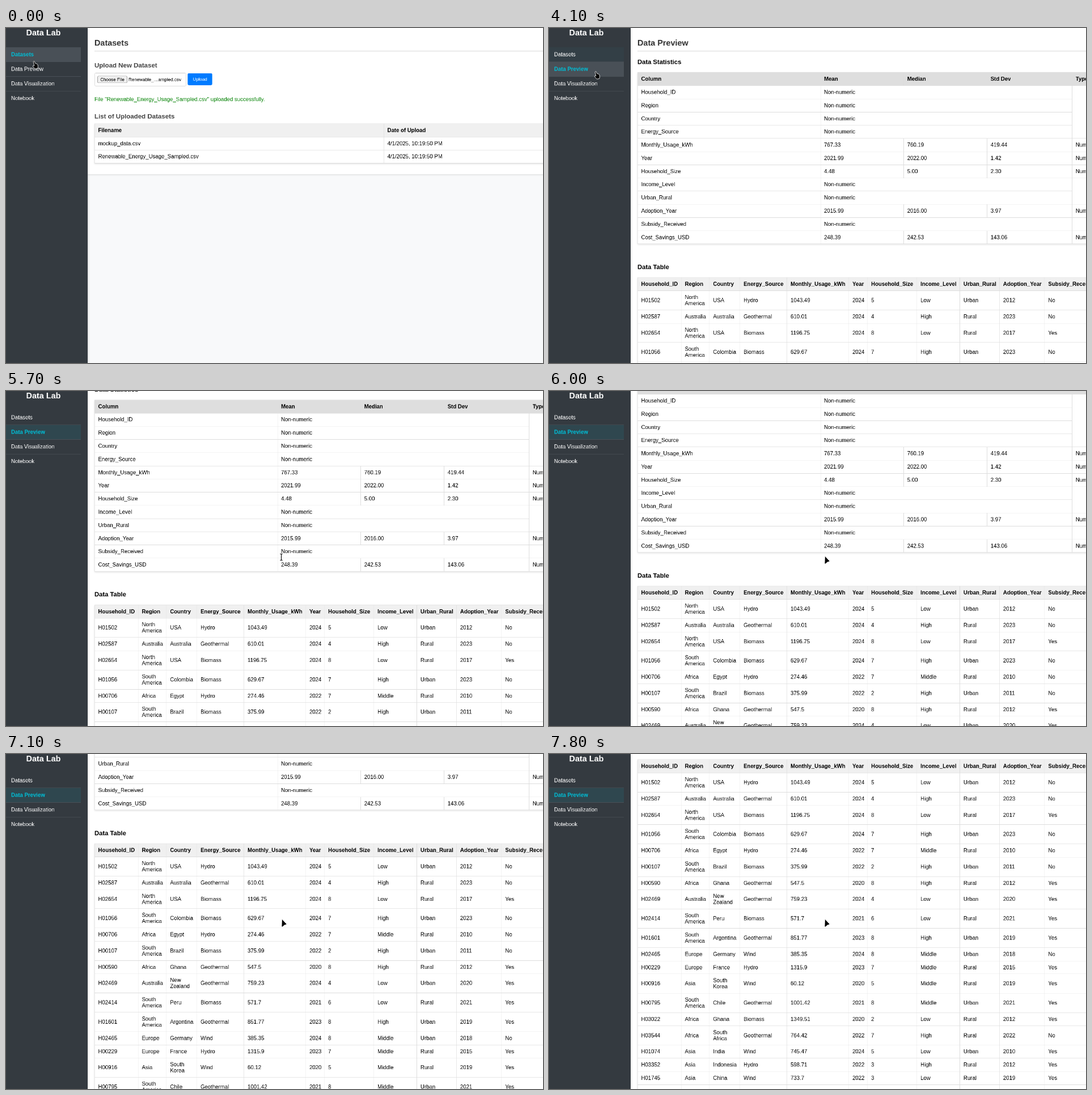
Write an HTML page that moves like this. It is 947 by 591 pixels and loops after 8000 ms.

```html
<!DOCTYPE html>
<html lang="en">
<head>
<meta charset="utf-8">
<title>Dataset browser</title>
<style>
  html, body { margin: 0; width: 100%; height: 100%; overflow: hidden; background: #f8f9fa; }
  /* will-change keeps the text drawn at full size and then scaled down smoothly */
  #app {
    position: absolute; width: 1579px; height: 985px; overflow: hidden; background: #f8f9fa;
    transform: scale(.6); transform-origin: 0 0; will-change: transform;
    font: 16px/18px "Liberation Sans", Arial, sans-serif; color: #000;
  }
  #side {
    position: absolute; left: 0; top: 0; width: 240px; height: 100%;
    background: #343a40; color: #fff; box-shadow: 2px 0 5px rgba(0,0,0,.15);
  }
  #side h1 { position: absolute; top: 0; width: 220px; margin: 0; font-size: 24px; line-height: 28px; text-align: center; }
  nav { position: absolute; top: 57.3px; width: 220px; }
  nav div { box-sizing: border-box; height: 42.8px; padding: 12px 15px; border-bottom: 1px solid #495057; }
  nav div:last-child { border: 0; }
  nav .active { color: #00bcd4; font-weight: bold; }
  .page { position: absolute; left: 240px; top: 0; width: 1600px; background: #fff; box-shadow: 0 2px 4px rgba(0,0,0,.12); }
  #datasets { height: 429.5px; }
  #preview { height: 2400px; }
  .page > * { position: absolute; left: 20px; margin: 0; white-space: nowrap; }
  h2 { top: 30px; width: 1600px; height: 37px; font-size: 24px; line-height: 28px; color: #333; border-bottom: 2px solid #e2e2e2; }
  h3 { font-size: 18.72px; line-height: 22px; }
  #datasets h3 { font-size: 19.2px; color: #444; }
  table { border-collapse: collapse; table-layout: fixed; box-shadow: 0 2px 5px rgba(0,0,0,.12); }
  .page td, .page th { padding: 9.9px; border: 1px solid #ddd; text-align: left; white-space: normal; }
  th { background: #f0f0f0; white-space: nowrap !important; }
  #stats th { background: #dedede; }
  .file { top: 131.5px; box-sizing: border-box; width: 270px; height: 39px; border: 1px solid #ccc; border-radius: 4px; }
  .file, .upload { font-size: 13.333px; line-height: 15px; }
  .file span { position: absolute; left: 99px; top: 11px; }
  .file b {
    position: absolute; left: 8px; top: 8px; box-sizing: border-box; width: 87px; height: 21px; line-height: 19px;
    font-weight: normal; text-align: center; background: #efefef; border: 1px solid #767676; border-radius: 3px;
  }
  .page .upload { left: 294px; top: 133px; padding: 10px 15px; border-radius: 4px; background: #007bff; color: #fff; }
  #pointer { position: absolute; left: 0; top: 0; width: 20px; height: 20px; overflow: visible; }
</style>
</head>
<body>
<div id="app">
  <section class="page" id="datasets">
    <h2>Datasets</h2>
    <h3 style="top:99px">Upload New Dataset</h3>
    <div class="file"><b>Choose File</b><span>Renewable_…ampled.csv</span></div>
    <div class="upload">Upload</div>
    <p style="top:201px;color:#008000">File "Renewable_Energy_Usage_Sampled.csv" uploaded successfully.</p>
    <h3 style="top:249px">List of Uploaded Datasets</h3>
    <table id="files" style="top:281px"></table>
  </section>
  <section class="page" id="preview">
    <h2>Data Preview</h2>
    <h3 style="top:89px">Data Statistics</h3>
    <table id="stats" style="top:130.3px"></table>
    <h3 style="top:691.5px">Data Table</h3>
    <table id="records" style="top:733.3px"></table>
  </section>
  <aside id="side">
    <h1>Data Lab</h1>
    <nav><div>Datasets</div><div>Data Preview</div><div>Data Visualization</div><div>Notebook</div></nav>
  </aside>
</div>
<svg id="pointer" stroke="#fff" stroke-width=".8" stroke-linejoin="round">
  <path id="hand" d="M-1.3 1Q-.9-.4 .5.3L2.3 4.1Q6 4 6.6 6.6L7 10.2 6.2 12.9 1.9 13.6-1.9 9.5Q-2.8 7.8-1 7.8L.4 8.3Z"/>
  <path id="arrow" d="M0 0L8.2 8.8Q8.8 9.9 7.4 10.1L4.7 10.8 1.3 13.7Q-.5 14.6-.5 12.8Z"/>
  <path id="beam" d="M-2.2-5.8Q0-5.8 0-4.4Q0-5.8 2.2-5.8M0-4.4V4.4M-2.2 5.8Q0 5.8 0 4.4Q0 5.8 2.2 5.8" fill="none" stroke="#000" stroke-width="1.1"/>
</svg>
<script>
const $ = id => document.getElementById(id);

const cell = (tag, text, span = 1) => `<${tag} colspan="${span}">${text}</${tag}>`;
const row = (cells, tag = 'td') => `<tr>${cells.map(c => cell(tag, c)).join('')}</tr>`;

function fillTable(id, widths, head, rows) {
  const cols = widths.map(w => `<col style="width:${w}px">`).join('');
  $(id).style.width = widths.reduce((a, b) => a + b) + 'px';
  $(id).innerHTML = `<colgroup>${cols}</colgroup>` + row(head, 'th') + rows.join('');
}

const lines = text => text.trim().split('\n').map(line => line.trim().split(','));

fillTable('files', [850, 600], ['Filename', 'Date of Upload'],
  ['mockup_data.csv', 'Renewable_Energy_Usage_Sampled.csv'].map(name => row([name, '4/1/2025, 10:19:50 PM'])));

const stats = lines(`
  Household_ID
  Region
  Country
  Energy_Source
  Monthly_Usage_kWh,767.33,760.19,419.44
  Year,2021.99,2022.00,1.42
  Household_Size,4.48,5.00,2.30
  Income_Level
  Urban_Rural
  Adoption_Year,2015.99,2016.00,3.97
  Subsidy_Received
  Cost_Savings_USD,248.39,242.53,143.06`);
fillTable('stats', [537.5, 244.5, 245, 250, 200], ['Column', 'Mean', 'Median', 'Std Dev', 'Type'],
  stats.map(s => s.length > 1 ? row([...s, 'Numeric']) : `<tr>${cell('td', s[0])}${cell('td', 'Non-numeric', 3)}</tr>`));

const records = lines(`
  H01502,North America,USA,Hydro,1043.49,2024,5,Low,Urban,2012,No
  H02587,Australia,Australia,Geothermal,610.01,2024,4,High,Rural,2023,No
  H02654,North America,USA,Biomass,1196.75,2024,8,Low,Rural,2017,Yes
  H01056,South America,Colombia,Biomass,629.67,2024,7,High,Urban,2023,No
  H00706,Africa,Egypt,Hydro,274.46,2022,7,Middle,Rural,2010,No
  H00107,South America,Brazil,Biomass,375.99,2022,2,High,Urban,2011,No
  H00590,Africa,Ghana,Geothermal,547.5,2020,8,High,Rural,2012,Yes
  H02469,Australia,New Zealand,Geothermal,759.23,2024,4,Low,Urban,2020,Yes
  H02414,South America,Peru,Biomass,571.7,2021,6,Low,Rural,2021,Yes
  H01601,South America,Argentina,Geothermal,851.77,2023,8,High,Urban,2019,Yes
  H02465,Europe,Germany,Wind,385.35,2024,8,Middle,Urban,2018,No
  H00229,Europe,France,Hydro,1315.9,2023,7,Middle,Rural,2015,Yes
  H00916,Asia,South Korea,Wind,60.12,2020,5,Middle,Rural,2019,Yes
  H00795,South America,Chile,Geothermal,1001.42,2021,8,Middle,Urban,2021,Yes
  H03022,Africa,Ghana,Biomass,1349.51,2020,2,Low,Rural,2012,Yes
  H03544,Africa,South Africa,Geothermal,764.42,2022,7,High,Rural,2022,No
  H01074,Asia,India,Wind,745.47,2024,5,Low,Urban,2010,Yes
  H03352,Asia,Indonesia,Hydro,598.71,2022,3,High,Rural,2012,Yes
  H01745,Asia,China,Wind,733.7,2022,3,Low,Rural,2019,Yes
  &nbsp;,,,,,,,,,,`);
fillTable('records', [128.3, 83, 89.5, 138.3, 181.7, 55.2, 145, 126.5, 116.5, 132.5, 180],
  stats.slice(0, 11).map(s => s[0]), records.map(r => row(r)));

// Tables of [ms, ...values], linear in between.
const pointerPath = [[0, 49.5, 58.5], [1000, 49.5, 58.5], [1600, 82.5, 76.5], [4700, 82.5, 76.5],
  [4900, 109, 80], [5000, 109, 80], [5300, 330, 205], [5600, 485.5, 293]];
const scrollPath = [[0, 0], [5500, 0], [5600, 30], [5700, 104.5], [5800, 117], [5900, 122], [6000, 160],
  [6100, 225], [6200, 239], [6800, 239], [6900, 343], [7000, 420], [7100, 470], [7200, 478],
  [7400, 478], [7500, 507.5], [7600, 615], [7700, 700], [7800, 717]];

function sample(path, t) {
  const i = path.findIndex(k => k[0] > t);
  if (i < 0) return path[path.length - 1].slice(1);
  const a = path[i - 1], b = path[i], p = (t - a[0]) / (b[0] - a[0]);
  return a.slice(1).map((v, n) => v + (b[n + 1] - v) * p);
}

const ramp = (t, start) => Math.min(1, Math.max(0, (t - start) / 300));
const links = document.querySelectorAll('nav div');

function paintLink(link, active, idle, hover) {
  link.className = active ? 'active' : '';
  link.style.backgroundColor = `color-mix(in srgb, #495057 ${hover * 100}%, ${idle})`;
}

function render(t) {
  const onPreview = t >= 4100;
  $('datasets').style.display = onPreview ? 'none' : 'block';
  $('preview').style.display = onPreview ? 'block' : 'none';
  $('preview').style.top = -sample(scrollPath, t)[0] + 'px';

  const teal = '#2f474f', plain = '#343a40';
  paintLink(links[0], !onPreview, !onPreview ? teal : t < 5100 ? '#333f46' : plain, 1 - ramp(t, 1100));
  paintLink(links[1], onPreview, onPreview ? teal : plain, ramp(t, 1100) - ramp(t, 5000));

  const [x, y] = sample(pointerPath, t);
  const shape = t < 5100 ? 'hand' : t >= 5600 && t < 5800 ? 'beam' : 'arrow';
  for (const id of ['hand', 'arrow', 'beam']) $(id).style.display = id === shape ? '' : 'none';
  const [dx, dy] = shape === 'arrow' ? [1, -2] : [0, 0];
  $('pointer').style.transform = `translate(${x + dx}px, ${y + dy}px)`;
}

function tick() {
  render(Math.floor(performance.now() % 8000 / 100) * 100);
  requestAnimationFrame(tick);
}
tick();
</script>
</body>
</html>
```
